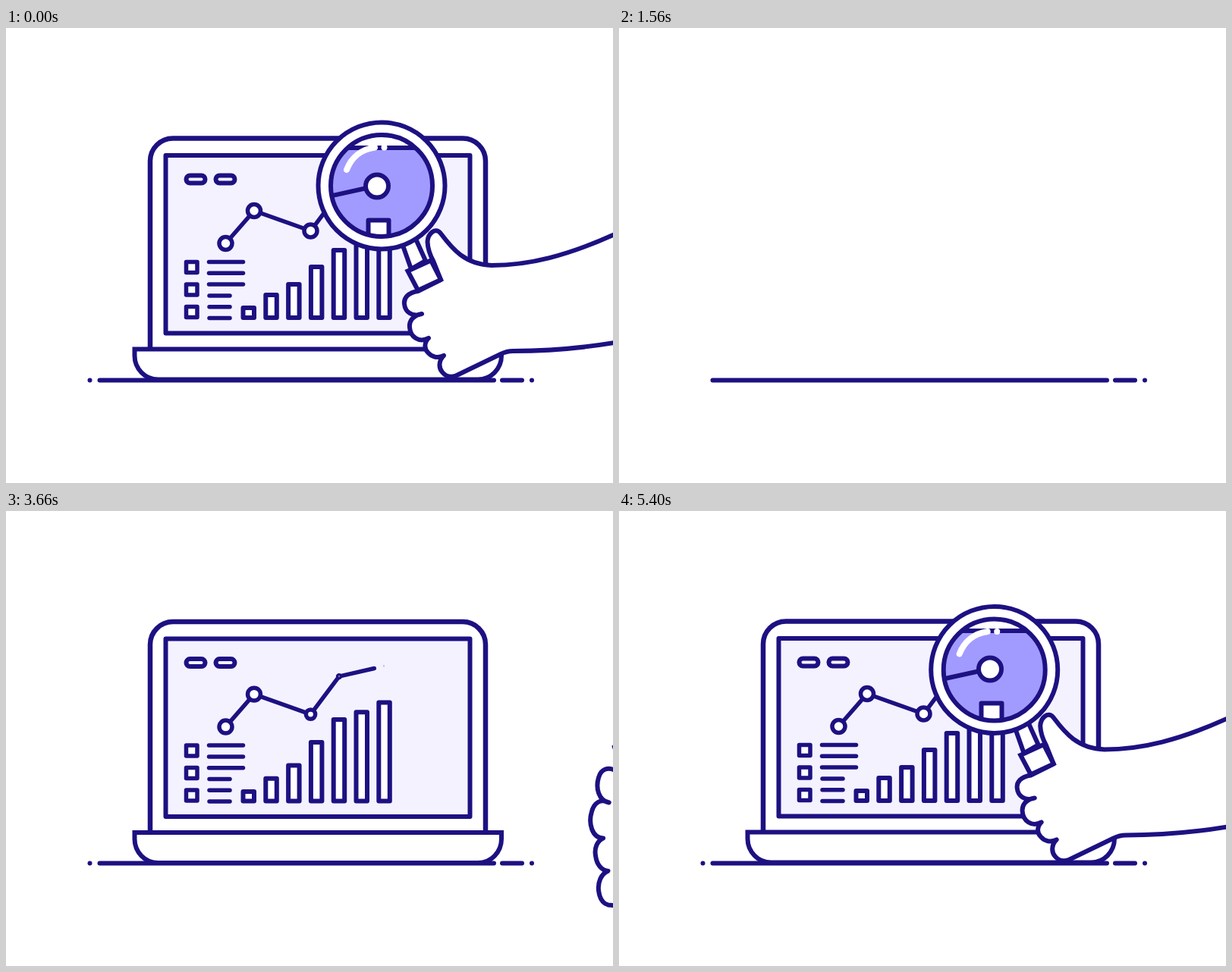
An HTML page for the animation above (5430 ms loop, 800x600 px).

```html
<!DOCTYPE html>
<html lang="en">
<head>
<meta charset="utf-8">
<title>Analytics laptop</title>
<style>
  html, body { margin: 0; width: 100%; height: 100%; overflow: hidden; background: #fff; }
  svg { display: block; width: 100vw; height: 100vh; }
  .ink { stroke: #1d1182; stroke-width: 6; fill: none; stroke-linecap: round; stroke-linejoin: round; }
  .sharp { stroke-linejoin: miter; }
  .tool * { vector-effect: non-scaling-stroke; }
</style>
</head>
<body>
<svg id="stage" viewBox="0 0 800 600"></svg>
<script>
const LOOP = 5430;
const stage = document.getElementById('stage');
const clamp = v => Math.max(0, Math.min(1, v));
const ramp = (t, start, length) => clamp((t - start) / length);
const smooth = p => p * p * (3 - 2 * p);

// Monotone cubic interpolation through [time, value...] keys, one column at a time.
function track(keys, t, col = 1) {
  const last = keys.length - 1;
  if (t <= keys[0][0]) return keys[0][col];
  if (t >= keys[last][0]) return keys[last][col];
  let i = 0;
  while (t > keys[i + 1][0]) i++;
  const slope = k => (keys[k + 1][col] - keys[k][col]) / (keys[k + 1][0] - keys[k][0]);
  const tangent = k => {
    if (k === 0) return slope(0);
    if (k === last) return slope(last - 1);
    const a = slope(k - 1), b = slope(k);
    return a * b <= 0 ? 0 : 2 * a * b / (a + b);
  };
  const [t0, t1] = [keys[i][0], keys[i + 1][0]];
  const d = t1 - t0, u = (t - t0) / d, u2 = u * u, u3 = u2 * u;
  return (2 * u3 - 3 * u2 + 1) * keys[i][col] + (u3 - 2 * u2 + u) * d * tangent(i)
    + (3 * u2 - 2 * u3) * keys[i + 1][col] + (u3 - u2) * d * tangent(i + 1);
}

const LIFT = [[500, 0], [750, 1.5], [1140, 5], [1300, 18], [1500, 52], [2310, 52], [2480, 0],
  [2700, -56], [2870, -69], [2910, -68], [3010, -54], [3140, -14], [3210, 0], [3660, .6], [4100, 0]];
const LID = [[400, 1], [600, .998], [750, .988], [950, .8], [1140, .38], [1290, 0], [2370, 0],
  [2560, .5], [2820, 1]];
const SHADE = [[300, 0], [600, .08], [750, .24], [1140, .9], [1290, 1], [2370, 1], [2560, .55],
  [2820, .1], [2910, .05], [3200, 0]];

// time, grip x, grip y, rotation, scale x, scale y, extra lens swing
const HAND = [
  [3540, 980, 330, 36, 1, 1.45, 75], [3660, 823, 322, 29, 1, 1.45, 60],
  [3840, 690, 246, 18, 1, 1.12, 10], [4020, 610, 282, 8, .98, 1.05, 0],
  [4200, 572, 320, 3, .985, 1.03, 0], [4560, 549, 340, 0, 1, 1, 0],
  [4860, 547, 349, -.5, 1, 1, 0], [5130, 549, 341, 0, 1, 1, 0],
  [5430, 551, 326, 0, 1, 1, 0], [6000, 566, 299, 2, .99, 1.02, 0],
  [6180, 581, 275, 4, .98, 1.04, 0], [6380, 700, 215, 18, 1, 1.1, 8],
  [6540, 1030, 230, 36, 1, 1.2, 55]];

const line = (d, extra = '') => `<path class="ink" d="${d}" ${extra}/>`;
const dash = (from, to) => `pathLength="1" stroke-dasharray="0 ${from} ${to - from} 2"`;
const trimMid = p => p >= 1 ? '' : dash(.5 - p / 2, .5 + p / 2);
const circle = (x, y, r, extra = '') => `<circle class="ink" cx="${x}" cy="${y}" r="${r}" ${extra}/>`;

function ground(t) {
  const from = 100 + 600 * smooth(ramp(t, 1490, 650));
  const shown = t < 2150 ? [from, 700] : [100, Math.min(700, 105 + .652 * (t - 2160))];
  return `<clipPath id="sweep"><rect x="${shown[0]}" y="455" width="${Math.max(0, shown[1] - shown[0])}" height="20"/></clipPath>
    <g clip-path="url(#sweep)">${line('M110.5 464.5h.01M123.5 464.5H643M654 464.5H680M693 464.5h.01')}</g>`;
}

function chart(t, y, squash) {
  const build = t > 2600 ? t : t < 1300 ? 9999 : 0;
  if (!build) return '';
  let out = '';

  [250, 289].forEach((x, i) => {
    const p = ramp(build, 2885 - 45 * i, 200);
    const [top, bottom] = [y(194.5), y(204.5)], r = (bottom - top) / 2;
    const arc = `A5 ${r} 0 0 1`;
    if (p) out += line(`M${x - 12.5} ${y(199.5)}${arc} ${x - 7.5} ${top}H${x + 7.5}${arc} ${x + 12.5} ${y(199.5)}${arc} ${x + 7.5} ${bottom}H${x - 7.5}${arc} ${x - 12.5} ${y(199.5)}`,
      `fill-opacity="0" ${trimMid(p)}`);
  });

  for (let i = 0; i < 3; i++) {
    const cy = 315.5 + 29.5 * i, p = ramp(build, 2830 - 16 * i, 190);
    if (p) out += line(`M237.5 ${y(cy - 7)}H252V${y(cy + 7)}H237.5Z`,
      `${trimMid(p)} style="fill:${p === 1 ? '#fff' : 'none'};stroke-width:5.5"`);
  }
  for (let i = 0; i < 6; i++) {
    const long = i < 3, right = long ? 312.5 : 295;
    const p = smooth(ramp(build, (long ? 2890 : 2950) + 15 * (i % 3), 300));
    if (p) out += line(`M${right} ${y(308.5 + 14.8 * i)}H${right - p * (long ? 45 : 27)}`, 'style="stroke-width:5.5"');
  }

  [13, 30, 44, 67, 89, 104, 154].forEach((height, i) => {
    const age = build - 3192 - 60 * i;
    if (age <= 0) return;
    const h = height * (1 - Math.exp(-.0063 * age) * Math.cos(Math.PI * age / 272));
    const x = 312.5 + 29.8 * i;
    out += line(`M${x} ${y(382)}V${y(382 - h)}H${x + 14.5}V${y(382)}Z`, 'style="fill:#fff"');
  });

  const points = [[289.5, 284], [327, 241], [401.5, 267.5], [439, 217.5], [498, 204]];
  const drawn = ramp(build, 3300, 380);
  if (drawn) out += line('M' + points.map(([x, py]) => `${x} ${y(py)}`).join('L'),
    `${drawn < 1 ? dash(0, drawn) : ''} style="stroke-width:5.5"`);
  points.forEach(([x, py], i) => {
    const p = smooth(ramp(build, 3410 + 60 * i, 200));
    if (p) out += circle(x, y(py), 8.5 * p, `style="fill:#fff;stroke-width:${Math.min(5.5, 2 + 5 * p)}"`);
  });
  return out;
}

function laptop(t) {
  const lift = track(LIFT, t), lid = track(LID, t), shade = track(SHADE, t);
  if (lift > 50) return '';
  const hinge = v => 423.5 - (423.5 - v) * lid;
  const squash = 1 - .23 * shade;
  const inside = v => hinge(383 - (383 - v) * squash);
  const mix = (a, b) => Math.round(a + (b - a) * shade);
  const fill = `rgb(${mix(244, 162)},${mix(242, 155)},255)`;
  let out = '';
  if (lid > .01) {
    const ry = 30 * lid;
    out += line(`M190 423.5V${hinge(175.5)}A30 ${ry} 0 0 1 220 ${hinge(145.5)}H602A30 ${ry} 0 0 1 632 ${hinge(175.5)}V423.5`, 'style="fill:#fff;stroke-width:6.5"');
    out += line(`M210.5 ${hinge(168)}H611.5V${hinge(402.5)}H210.5Z`, `style="fill:${fill}"`);
    out += chart(t, inside);
  }
  out += `<path class="ink sharp" d="M169.5 423.5H653V432A31 31.5 0 0 1 622 463.5H200.5A31 31.5 0 0 1 169.5 432Z" style="fill:#fff"/>`;
  return `<g clip-path="url(#above)"><g transform="translate(0 ${lift})">${out}</g></g>`;
}

function magnified() {
  return `<rect width="800" height="600" fill="#a29bff"/>
    ${line('M-80 600V170Q-80 118.5 -28 118.5H683Q735 118.5 735 170V600', 'style="fill:#fff"')}
    ${line('M-40 600V158H696V600', 'style="fill:#a29bff"')}
    ${line('M378 232.5L489 208')}
    ${circle(489, 208.5, 15, 'style="fill:#fff"')}
    ${line('M477.5 600V253.5H504.5V600', 'style="fill:#fff"')}`;
}

const HAND_SHAPE = `M543 347C530 349 524 356 525 364C526 374 535 382 548 377
  C536 379 531 387 532 395C533 407 544 416 557 409C551 415 551 423 556 428
  C561 434 569 436 577 432C570 439 570 448 575 454C580 460 586 461 592 459
  L652 430C658 427 661 426 668 426C715 426 760 422 802 415C880 402 950 385 1100 330
  L1100 120C980 190 890 240 800 273C740 300 690 313 640 313C605 312 588 291 573 271
  C566 262 556 271 555.5 282C556 292 558 298 563 307L573 332Z`;

function hand(time) {
  const t = time < 1300 ? time + LOOP : time;
  if (t <= HAND[0][0] || t >= HAND[HAND.length - 1][0]) return '';
  const [x, y, turn, sx, sy, swing] = [1, 2, 3, 4, 5, 6].map(c => track(HAND, t, c));
  const pose = angle => `transform="translate(${x} ${y}) scale(${sx} ${sy}) rotate(${angle}) translate(-551 -326)"`;
  const body = pose(turn), lens = pose(turn + swing);
  return `<clipPath id="glass"><circle cx="495" cy="208" r="67" ${lens}/></clipPath>
    <g class="tool" ${lens}>
      ${line('M522 284L534 318L553 307L539 276Z', 'style="fill:#fff"')}
      ${circle(495, 208, 83.5, 'style="fill:#fff"')}
    </g>
    <g clip-path="url(#glass)">${magnified()}</g>
    <g class="tool" ${lens}>
      ${circle(495, 208, 67)}
      ${line('M449 187C455 171 468 160 486 157.5M498.5 157.5h.01', 'style="stroke:#fff;stroke-width:8"')}
    </g>
    <g class="tool" ${body}>${line(HAND_SHAPE, 'style="fill:#fff"')}</g>
    <g class="tool" ${lens}><path class="ink sharp" d="M529.5 320.5L560 306.5L573 332L543 346Z" style="fill:#fff"/></g>`;
}

function draw(t) {
  stage.innerHTML = `<clipPath id="above"><rect width="800" height="467"/></clipPath>`
    + ground(t) + laptop(t) + hand(t);
}

const begin = performance.now();
function frame() {
  draw((performance.now() - begin) % LOOP);
  requestAnimationFrame(frame);
}
draw(0);
requestAnimationFrame(frame);
</script>
</body>
</html>
```
